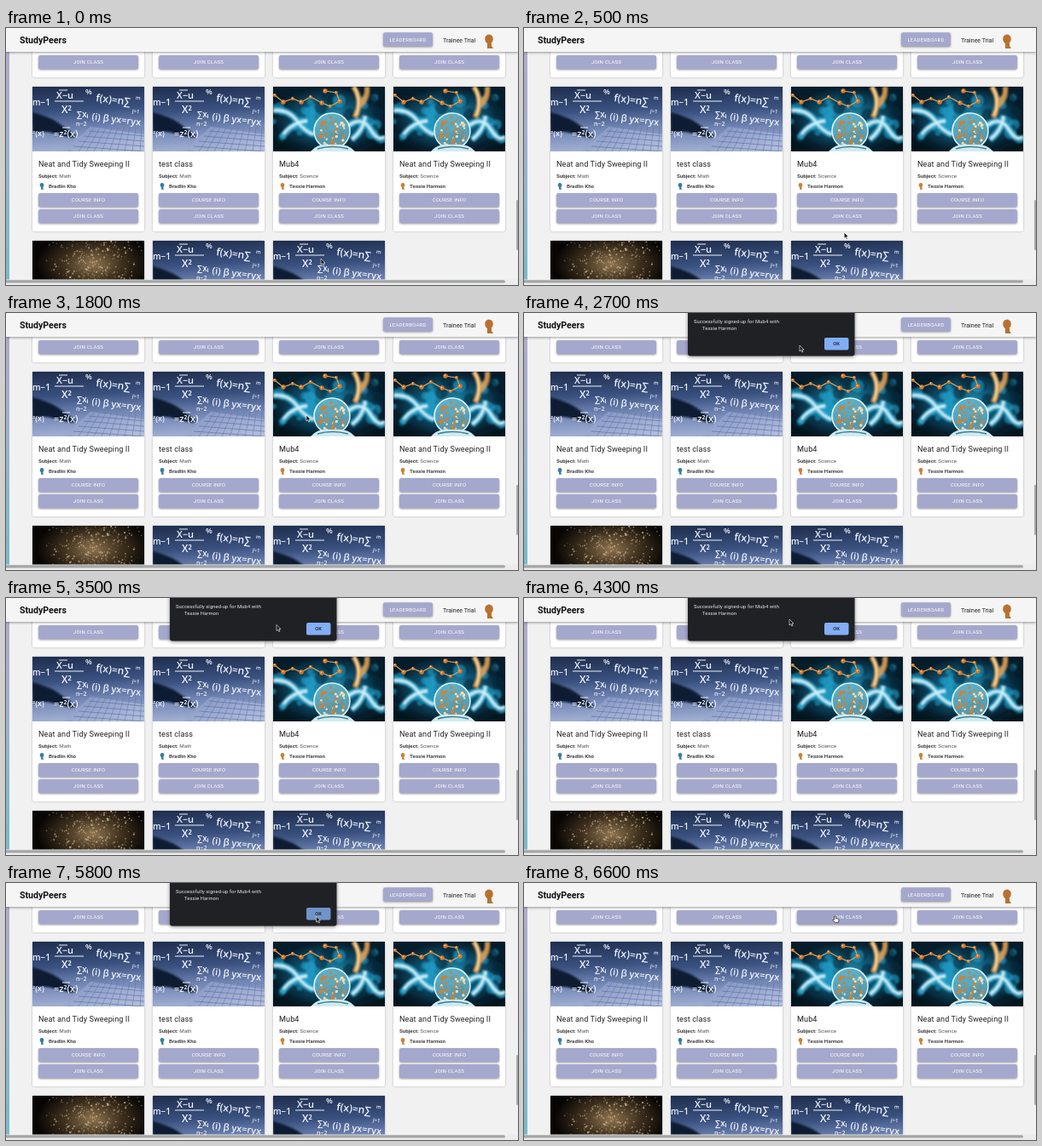
An HTML page that plays this animation: 600x302 px, repeating every 6.7 s.

```html
<!DOCTYPE html>
<html lang="en">
<head>
<meta charset="utf-8">
<title>Class list</title>
<style>
  html, body { margin: 0; width: 100%; height: 100%; overflow: hidden; background: #f1f1f1; }
  svg { display: block; }
  #stage { width: 600px; height: 302px; font-family: Roboto, Arial, sans-serif; }
  .card { fill: #fff; filter: drop-shadow(0 .8px .8px #0004); }
  .btn rect { fill: #a5a8cd; filter: drop-shadow(0 1px .8px #0006); }
  .btn.hover rect { fill: #9fa2c9; filter: drop-shadow(0 1.5px 1.5px #0008); }
  .btn text { fill: #fff; font-size: 6px; letter-spacing: .2px; text-anchor: middle; }
  .name { font-size: 9.1px; letter-spacing: .1px; fill: #222; }
  .info { font-size: 6.2px; fill: #555; }
  .info tspan, .bold { font-weight: 700; fill: #444; }
  .chalk { fill: #eef2fb; font-family: "Open Sans", sans-serif; font-weight: 600; }
</style>
</head>
<body>
<svg id="stage" viewBox="0 0 600 302"></svg>
<script>
const stage = document.getElementById('stage');
const $ = id => document.getElementById(id);
const LOOP = 6700;

let seed = 7;
const rand = () => (seed = seed * 16807 % 2147483647) / 2147483647;
const repeat = (n, draw) => Array.from({ length: n }, (_, i) => draw(i)).join('');
const rect = (x, y, w, h, fill, more = '') =>
  `<rect x="${x}" y="${y}" width="${w}" height="${h}" fill="${fill}" ${more}/>`;
const dot = (x, y, r, fill, more = '') => `<circle cx="${x}" cy="${y}" r="${r}" fill="${fill}" ${more}/>`;
const text = (x, y, str, more = '') => `<text x="${x}" y="${y}" ${more}>${str}</text>`;
const line = (d, color, width, more = '') =>
  `<path d="${d}" fill="none" stroke="${color}" stroke-width="${width}" ${more}/>`;

// Each picture is a 131 by 76 symbol
const picture = (id, body) => `<symbol id="${id}" viewBox="0 0 131 76">${body}</symbol>`;

const chalk = (list, more = '') =>
  `<g class="chalk" ${more}>${list.map(([x, y, size, s]) => text(x, y, s, `font-size="${size}"`)).join('')}</g>`;
const math = picture('math',
  rect(0, 0, 131, 76, 'url(#mathSky)') +
  '<path d="M36 76L68 47L131 56V76Z" fill="url(#keys)"/>' +
  repeat(5, i => line(`M${66 - i * 6} ${52 + i * 6}L131 ${58 + i * 6}`, '#53669a', .8, 'opacity=".7"')) +
  repeat(10, i => line(`M${72 + i * 7} 48l${i * 2 - 18} 28`, '#53669a', .7, 'opacity=".6"')) +
  '<path d="M0 30Q24 36 38 48L52 58L46 60L28 56Q14 50 0 55Z" fill="#101a30" filter="url(#soft)"/>' +
  line('M26 17H60M31 4H41M35 48H44', '#eef2fb', 1.2) +
  chalk([
    [0, 22, 10, 'm−1'], [28, 14, 11, 'X−u'], [34, 31, 12, 'X²'], [62, 9, 9, '%'],
    [52, 36, 10, '∑xᵢ'], [51, 46, 7, 'n−2'], [0, 58, 9, '²(x)'], [25, 59, 11, '=z²(x)']
  ]) +
  chalk([
    [74, 17, 12, 'f(x)=n∑'], [120, 9, 6, 'm'], [118, 25, 6, 'j=1'],
    [72, 39, 11, '(i) β yx=ryx']
  ], 'transform="rotate(7 74 17)"'));

const chain = [[2, 10], [12, 18], [23, 14], [33, 18], [44, 12], [57, 19], [67, 23], [78, 17], [74, 7], [61, 5]];
const science = picture('science',
  rect(0, 0, 131, 76, 'url(#deep)') +
  '<g filter="url(#soft)">' +
  repeat(40, i => dot(rand() * 131, 10 + rand() * 50, 2 + rand() * 6, i % 3 ? '#1f9fca' : '#062536', 'opacity=".6"')) +
  line('M0 28Q18 26 28 40T48 56M10 60Q22 42 40 40M88 46Q104 34 114 50T131 60M92 62Q106 52 108 34', '#35bde3', 8, 'opacity=".75"') +
  line('M0 28Q18 26 28 40T48 56M12 56Q22 42 40 40M88 46Q104 34 114 50T131 58M92 62Q106 52 108 34', '#e2f9fd', 3, 'opacity=".9"') +
  line('M94 0Q106 16 96 36M110 0Q112 12 100 24', '#e0a052', 6, 'opacity=".9"') +
  line('M95 0Q104 16 97 34', '#ffe2a6', 2) +
  '<path d="M0 62L34 76H0ZM131 64L104 76H131Z" fill="#03131f"/></g>' +
  `<polyline points="${chain.join(' ')}" fill="none" stroke="#d9a45c" stroke-width="1.2"/>` +
  chain.map(([x, y], i) => dot(x, y, 1.9 + i % 2 * .8, '#d8772b') + dot(x - .6, y - .6, .8, '#ffd08b')).join('') +
  dot(69, 52, 21, '#6fb9cc', 'opacity=".75"') + dot(69, 52, 21, 'none', 'stroke="#e0f7fa" stroke-width="1.5"') +
  repeat(65, i => {
    const a = rand() * 6.28, r = Math.sqrt(rand()) * 17;
    return dot(69 + r * Math.cos(a), 53 + r * Math.sin(a), .6 + rand() * 1.3, i % 3 ? '#c7833f' : '#f5e0b5');
  }) +
  '<path d="M44 76Q52 66 69 68Q88 66 96 76Z" fill="#cfeaf0"/>' + line('M52 73Q69 68 88 73', '#3a7f95', 1.6));

const sparks = picture('sparks',
  rect(0, 0, 131, 76, 'url(#glow)') +
  repeat(420, () => {
    const x = 70 + (rand() + rand() - 1) * 58, y = rand() * 60;
    return dot(x.toFixed(1), y.toFixed(1), (.3 + rand() * .9).toFixed(2), '#dcc39a', `opacity="${(.15 + rand() * .6).toFixed(2)}"`);
  }));

const stops = list => list.map(([at, color]) => `<stop offset="${at}" stop-color="${color}"/>`).join('');
const defs = `<defs>
  <linearGradient id="mathSky" x2=".1" y2="1">${stops([[0, '#1e2d4d'], [.4, '#3a517f'], [.7, '#7488b6'], [1, '#a0aed2']])}</linearGradient>
  <linearGradient id="keys" y2="1">${stops([[0, '#7f92c0'], [1, '#b4c0df']])}</linearGradient>
  <radialGradient id="deep">${stops([[0, '#2a9dbd'], [.5, '#0f5877'], [1, '#051c2a']])}</radialGradient>
  <radialGradient id="glow" cx=".54" cy=".36" r=".5">${stops([[0, '#8d7450'], [.5, '#41321f'], [1, '#080605']])}</radialGradient>
  <linearGradient id="strip" x2="0" y2="1">${stops([[0, '#b3aacb'], [.5, '#98b3d0'], [1, '#78bac9']])}</linearGradient>
  <filter id="soft"><feGaussianBlur stdDeviation=".9"/></filter>
  ${math}${science}${sparks}</defs>`;

const buttons = [];
function button(x, y, w, label) {
  buttons.push({ x, y, w });
  return `<g class="btn">${rect(x, y, w, 16.2, '', 'rx="2.2"')}${text(x + w / 2, y + 10.3, label)}</g>`;
}

const avatar = (x, y, color, scale = 1) => `<g transform="translate(${x} ${y}) scale(${scale})" fill="${color}">
  <ellipse cy="-3" rx="4.8" ry="5.5"/><path d="M-2 2H3V5L5 8H-2Z"/></g>`;

const columns = [31, 172, 313, 454];
const courses = [
  ['Neat and Tidy Sweeping II', 'math'], ['test class', 'math'],
  ['Mub4', 'science'], ['Neat and Tidy Sweeping II', 'science']
];
const teachers = {
  math: ['Math', 'Bradlin Kho', '#347f9d'],
  science: ['Science', 'Tessie Harmon', '#c8823a']
};
const show = (id, x, y) => `<use href="#${id}" x="${x}" y="${y}" width="131" height="76"/>`;
const panel = (x, y) => rect(x, y, 131, 170, '', 'class="card" rx="2"');

function course([name, kind], i) {
  const x = columns[i], [subject, teacher, color] = teachers[kind];
  return panel(x, -112) + button(x + 7, 32, 117, 'JOIN CLASS') +
    panel(x, 69) + show(kind, x, 69) +
    text(x + 7, 162.5, name, 'class="name"') +
    text(x + 7, 175.5, `<tspan>Subject:</tspan> ${subject}`, 'class="info"') +
    avatar(x + 11, 186, color, .48) +
    text(x + 19, 188, teacher, 'class="info bold"') +
    button(x + 7, 194, 117, 'COURSE INFO') + button(x + 7, 213, 117, 'JOIN CLASS');
}

stage.innerHTML = defs +
  rect(0, 0, 600, 302, '#f1f1f1') + rect(0, 28, 4, 268, 'url(#strip)') +
  courses.map(course).join('') +
  ['sparks', 'math', 'math'].map((id, i) => panel(columns[i], 250) + show(id, columns[i], 250)).join('') +
  `<clipPath id="joinClip">${rect(320, 213, 117, 16, '#fff', 'rx="2"')}</clipPath>
  <g clip-path="url(#joinClip)">${dot(378, 221, 1, '#fff', 'id="ripple"')}</g>` +
  rect(598, 202, 2, 59, '#a8a8a8', 'rx="1"') +
  rect(0, 0, 600, 28, '#f5f5f5', 'style="filter:drop-shadow(0 1px 1.5px #0006)"') +
  text(16, 18, 'StudyPeers', 'font-size="10.6" font-weight="700" fill="#111"') +
  button(442, 5.2, 58, 'LEADERBOARD') +
  text(512, 17, 'Trainee Trial', 'font-size="7.05" fill="#222"') +
  avatar(566, 16, '#b9702f') +
  rect(0, 295.5, 600, 7, '#ececec') + rect(-3, 296.3, 588, 3.2, '#a3a6a6', 'rx="1.6"') +
  `<g id="badge">${rect(560, 268, 15, 14, '#080808', 'rx="2"')}
    ${dot(565.5, 273, .8, '#ddd')}${dot(569.5, 275, .8, '#ddd')}${dot(566, 277.5, .8, '#ddd')}</g>
  <g id="dialog" font-size="5.8" letter-spacing=".1" fill="#e8eaed">
    ${rect(192, -5, 195.5, 55.5, '#202124', 'rx="3" style="filter:drop-shadow(0 1px 2px #0007)"')}
    ${text(199, 12, 'Successfully signed-up for Mub4 with')}${text(209, 20.3, 'Tessie Harmon')}
    ${rect(352, 29, 28.5, 14.5, '#82aef5', 'id="ok" rx="2"')}
    ${text(366.2, 38.4, 'OK', 'text-anchor="middle" fill="#202124" font-weight="500"')}</g>
  <g id="cursor" stroke-linejoin="round">
    <path id="arrow" d="M0 0V7L1.7 5.5L2.8 8L4 7.5L2.9 5H5Z" fill="#111" stroke="#fff" stroke-width=".6"/>
    <path id="hand" d="M0 0Q.9-.8 1.6 0V2.5L5 3.2Q5.7 3.4 5.5 4.5L5 7.4H.9L-1.9 4.4Q-1.7 3.4-.6 3.9L0 4.4Z" fill="#fff" stroke="#111" stroke-width=".7"/>
  </g>`;

const nodes = [...document.querySelectorAll('.btn')];
const path = [
  [0, 369, 271], [200, 370, 268], [700, 378, 225], [900, 377.5, 219], [1300, 377.5, 219],
  [1800, 352, 120], [2300, 326, 52], [2700, 323, 38], [4300, 311, 25],
  [4900, 322, 28], [5500, 363.5, 39], [6700, 363.5, 39]
];

function position(t) {
  const i = path.findIndex(p => p[0] > t);
  const [t0, x0, y0] = path[i - 1], [t1, x1, y1] = path[i];
  const k = (t - t0) / (t1 - t0), e = k * k * (3 - 2 * k);
  return [x0 + (x1 - x0) * e, y0 + (y1 - y0) * e];
}

const visible = (id, on) => $(id).setAttribute('visibility', on ? 'visible' : 'hidden');

function draw() {
  const t = Math.floor(performance.now() % LOOP / 100) * 100;
  const [x, y] = position(t);
  const open = t >= 2100 && t < 6000;
  const target = open ? -1 : buttons.findIndex(b => x >= b.x && x <= b.x + b.w && y >= b.y && y <= b.y + 16);
  nodes.forEach((node, i) => node.classList.toggle('hover', i === target));
  visible('dialog', open);
  visible('badge', t >= 800 && t < 1400);
  visible('arrow', target < 0);
  visible('hand', target >= 0);
  $('cursor').setAttribute('transform', `translate(${x} ${y})`);
  $('ok').setAttribute('fill', t >= 5700 ? '#6f94ca' : '#82aef5');

  const age = (t - 900) / 500;
  $('ripple').setAttribute('r', Math.max(0, 35 + age * 55));
  $('ripple').setAttribute('opacity', age >= 0 && age < 1 ? .16 * (1 - age) : 0);
  requestAnimationFrame(draw);
}
draw();
</script>
</body>
</html>
```
